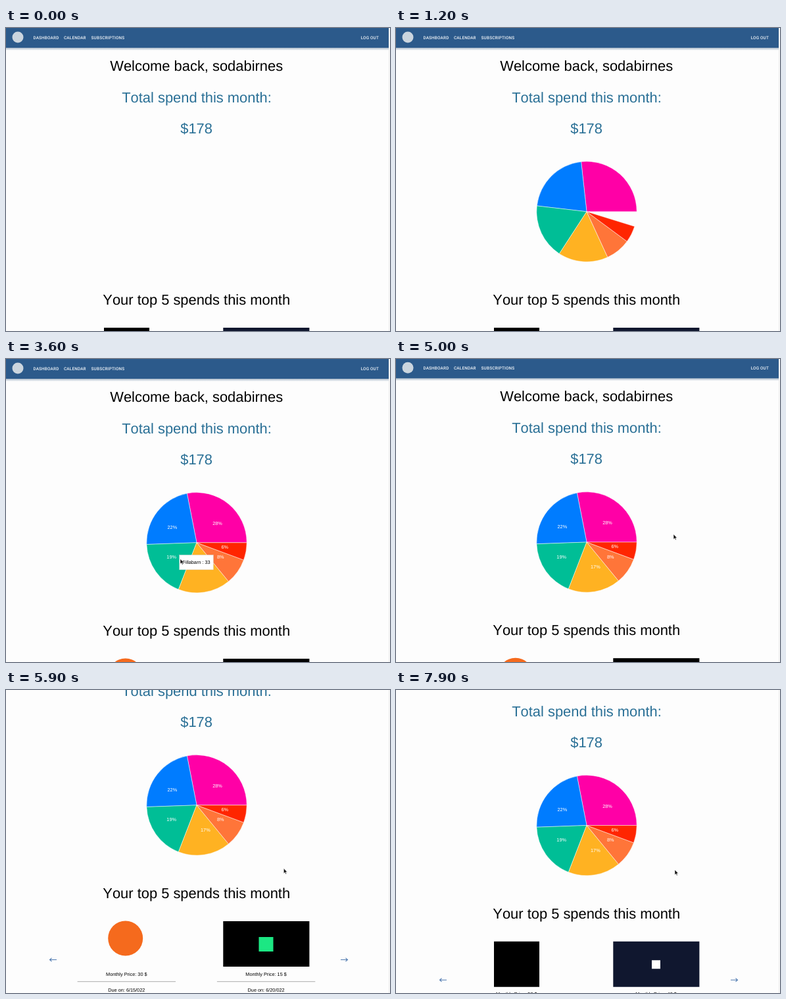
An HTML page for the animation above (8 s loop, 584x460 px).

```html
<!DOCTYPE html>
<html lang="en">
<head>
<meta charset="utf-8">
<title>Spending dashboard</title>
<style>
  html, body { margin: 0; width: 100%; height: 100%; overflow: hidden; background: #fdfdfd; }
  svg { display: block; width: 584px; height: 460px; }
  text { font-family: "Liberation Sans", Arial, sans-serif; font-kerning: none; text-rendering: geometricPrecision; }
  .nav text { font: 500 6.38px Roboto, sans-serif; letter-spacing: .18px; fill: #f1f5f9; }
  .head { font-size: 21.9px; text-anchor: middle; }
  .blue { fill: #2a7096; }
  .small { font-size: 7.3px; }
  .mid { text-anchor: middle; }
  .labels { fill: #fff; }
  .arrow { fill: none; stroke: #4f7ab0; stroke-width: 1.1; }
</style>
</head>
<body>
<svg viewBox="0 0 584 460">
  <defs>
    <clipPath id="view"><rect x="77" y="440" width="426" height="200"/></clipPath>
    <linearGradient id="shade" x2="0" y2="1">
      <stop stop-color="#5b7898" stop-opacity=".65"/>
      <stop offset="1" stop-color="#5b7898" stop-opacity="0"/>
    </linearGradient>
  </defs>
  <rect width="584" height="460" fill="#fdfdfd"/>
  <g id="page">
    <g class="nav">
      <rect y="29" width="582" height="5" fill="url(#shade)"/>
      <rect width="582" height="30" fill="#2c5a8b"/>
      <circle cx="18" cy="14" r="8.5" fill="#cbd5de"/>
      <text x="41.4" y="16.6">DASHBOARD</text>
      <text x="88" y="16.6">CALENDAR</text>
      <text x="129.6" y="16.6">SUBSCRIPTIONS</text>
      <text x="539.7" y="16.6">LOG OUT</text>
    </g>
    <text class="head" x="289.7" y="65.2">Welcome back, sodabirnes</text>
    <text class="head blue" x="290" y="112.8">Total spend this month:</text>
    <text class="head blue" x="289.6" y="160.2">$178</text>
    <g id="pie" stroke="#fff" stroke-width=".5"></g>
    <g id="labels" class="small labels"></g>
    <text class="head" x="289.7" y="420">Your top 5 spends this month</text>
    <g clip-path="url(#view)"><g id="strip"></g></g>
    <path class="arrow" d="M77 513.5H66.5M69.5 510.8L66.5 513.5L69.5 516.2"/>
    <path class="arrow" d="M509 513.5H519.5M516.5 510.8L519.5 513.5L516.5 516.2"/>
    <g id="tip">
      <rect width="52" height="22.4" fill="#fff" stroke="#ccc" stroke-width=".45"/>
      <text class="small" x="4.7" y="13.8"></text>
    </g>
  </g>
  <path d="M582.5 0V460" stroke="#ececec"/>
  <path d="M583.5 0V460" stroke="#fafafa"/>
  <path id="cursor" d="M0 0V7.6L1.8 6L3 8.7L4.2 8.2L3 5.6H5.4Z" fill="#111" stroke="#fff" stroke-width=".5"/>
</svg>
<script>
const LOOP = 8000, STEP = 100;
const CX = 290, CY = 278.8, R = 76.2, PAGE = 425;
const $ = id => document.getElementById(id);
const show = (el, on) => { el.style.display = on ? "" : "none"; };
const place = (el, x, y) => el.setAttribute("transform", `translate(${x.toFixed(2)} ${y.toFixed(2)})`);
const mix = (a, b, k) => a.map((v, i) => v + (b[i] - v) * k);
const clamp = v => Math.max(0, Math.min(1, v));
const smooth = v => { const k = clamp(v); return k * k * (3 - 2 * k); };

// CSS "ease": cubic-bezier(.25, .1, .25, 1)
function ease(v) {
  const x = clamp(v);
  let lo = 0, hi = 1;
  for (let i = 0; i < 24; i++) {
    const u = (lo + hi) / 2;
    if (.75 * u * (1 - u) + u ** 3 < x) lo = u; else hi = u;
  }
  return .3 * lo * (1 - lo) ** 2 + 3 * lo * lo * (1 - lo) + lo ** 3;
}

// Pie
const spends = [
  { name: "JK Liftnest", cost: 50, fill: "#ff00a6" },
  { name: "Lernoquill", cost: 40, fill: "#007cff" },
  { name: "Fillabarn", cost: 33, fill: "#00be96" },
  { name: "Noodlevue", cost: 30, fill: "#ffb222" },
  { name: "Zanu", cost: 15, fill: "#ff7539" },
  { name: "Tunopia", cost: 10, fill: "#ff2500" }
];
const total = spends.reduce((sum, s) => sum + s.cost, 0);

const polar = (deg, r) => {
  const a = deg * Math.PI / 180;
  return [CX + r * Math.cos(a), CY - r * Math.sin(a)];
};

let angle = 0;
for (const s of spends) {
  s.from = angle;
  s.to = angle += s.cost / total * 360;
  s.mid = polar((s.from + s.to) / 2, R / 2);
}

$("pie").innerHTML = spends.map(s => `<path fill="${s.fill}"/>`).join("");
$("labels").innerHTML = spends.map(s => {
  const [x, y] = s.mid;
  return `<text x="${x}" y="${y + 2.6}" text-anchor="${x > CX ? "start" : "end"}">${Math.round(s.cost / total * 100)}%</text>`;
}).join("");

function drawPie(t) {
  const grow = ease((t - 108) / 1500);
  spends.forEach((s, i) => {
    const a = polar(s.from * grow, R), b = polar(s.to * grow, R);
    $("pie").children[i].setAttribute("d", `M${CX} ${CY}L${a}A${R} ${R} 0 0 0 ${b}Z`);
  });
  show($("pie"), grow > 0);
  show($("labels"), grow > .9999);
}

// Carousel: two pages of two cards
const panel = (x, w, fill) => `<rect x="${x}" y="455" width="${w}" height="69" fill="${fill}"/>`;
const mark = (size, fill) => `<rect x="${395.5 - size / 2}" y="${490 - size / 2}" width="${size}" height="${size}" fill="${fill}"/>`;
const card = (x, art, price, due) => `${art}
  <text class="small mid" x="${x}" y="537.5">Monthly Price: ${price} $</text>
  <path d="M${x - 74.7} 546.7h149.4" stroke="#a3a3a3" stroke-width=".9"/>
  <text class="small mid" x="${x}" y="561.5">Due on: ${due}</text>`;
const first = card(183.3, panel(149, 69, "#000"), 50, "6/24/022")
  + card(395.6, panel(330.3, 131.1, "#10172f") + mark(13, "#fff"), 40, "6/18/022");
const second = card(183.3, `<circle cx="181.7" cy="481" r="26.5" fill="#f56a1d"/>`, 30, "6/15/022")
  + card(395.6, panel(330.3, 131.1, "#000") + mark(22, "#1ce783"), 15, "6/20/022");
$("strip").innerHTML = [first, second, first]
  .map((cards, i) => `<g transform="translate(${i * PAGE} 0)">${cards}</g>`).join("");

const slide = t => PAGE * (ease((t - 2965) / 500) + ease((t - 5965) / 500));
const scroll = t => 104 * (smooth((t - 4960) / 783) - smooth((t - 7618) / 783));

// Pointer stops: time, x, y
const stops = [
  [2100, 566, 4], [2500, 431, 188], [2700, 350, 262], [3000, 270, 236],
  [3600, 265, 303.5], [3900, 219, 297], [4150, 290, 328], [4400, 335, 290],
  [4600, 345, 256], [4900, 422, 265.5], [6300, 422.5, 273], [7500, 424, 273]
];

function pointer(t) {
  const i = stops.findIndex(s => s[0] > t);
  if (i < 1) return stops.at(i).slice(1);
  const [a, b] = [stops[i - 1], stops[i]];
  return mix(a, b, (t - a[0]) / (b[0] - a[0])).slice(1);
}

function sliceAt([x, y]) {
  if (Math.hypot(x - CX, y - CY) > R) return undefined;
  const deg = (Math.atan2(CY - y, x - CX) * 180 / Math.PI + 360) % 360;
  return spends.find(s => deg < s.to);
}

// Hover changes follow from the pointer's path
const hovers = [];
for (let t = stops[0][0]; t < 5000; t += 10) {
  const slice = sliceAt(pointer(t));
  if (slice !== hovers.at(-1)?.slice) hovers.push({ t, slice });
}

function tipAt(i, t) {
  const { t: since, slice } = hovers[i];
  const to = slice.mid.map(v => v + 4.6);
  return i ? mix(tipAt(i - 1, since), to, ease((t - since) / 400)) : to;
}

function drawTip(t) {
  const i = hovers.filter(h => h.t <= t).length - 1;
  const slice = hovers[i]?.slice;
  show($("tip"), slice);
  if (!slice) return;
  const [box, label] = $("tip").children;
  label.textContent = `${slice.name} : ${slice.cost}`;
  box.setAttribute("width", label.getComputedTextLength() + 9.4);
  place($("tip"), ...tipAt(i, t));
}

function draw(t) {
  drawPie(t);
  drawTip(t);
  place($("page"), 0, -scroll(t));
  place($("strip"), -slide(t), 0);
  show($("cursor"), t >= stops[0][0]);
  place($("cursor"), ...pointer(t));
}

const start = performance.now();
function tick() {
  const t = (performance.now() - start) % LOOP;
  draw(Math.floor(t / STEP) * STEP);
  requestAnimationFrame(tick);
}
tick();
</script>
</body>
</html>
```
